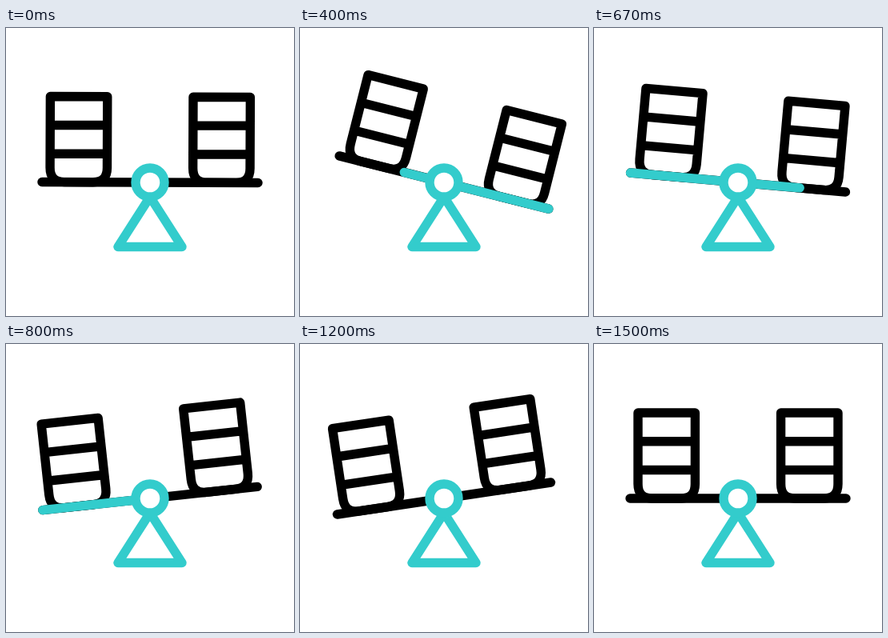
Recreate the animation shown at these times as an HTML page. Size 360 by 360 pixels, loop 1.67 s.

```html
<!DOCTYPE html>
<html lang="en">
<head>
<meta charset="utf-8">
<title>Seesaw</title>
<style>
  html, body { margin: 0; height: 100%; overflow: hidden; background: #fff; }
  svg { display: block; width: 100vw; height: 100vh; }
  .line { fill: none; stroke: #000; stroke-width: 11.4; stroke-linecap: round; stroke-linejoin: round; }
  .teal { stroke: #33cccc; }
</style>
</head>
<body>
<svg viewBox="0 0 360 360">
  <defs>
    <!-- Shelf unit standing on the beam, relative to the pivot -->
    <path id="shelves" d="M-35.7-107H35.7V-18Q35.7 0 18 0H-18Q-35.7 0-35.7-18ZM-35.7-71.3H35.7M-35.7-35.5H35.7"/>
  </defs>
  <g id="seesaw" class="line">
    <path d="M-135 0H135"/>
    <use href="#shelves" x="-89.3"/>
    <use href="#shelves" x="89.3"/>
    <path id="sweep" class="teal"/>
  </g>
  <path class="line teal" d="M180 211L140 273.5H220Z"/>
  <circle class="line teal" cx="180" cy="193" r="18" style="fill:#fff"/>
</svg>
<script>
  const LOOP = 1670, FRAME = 33.4, HALF = 135;
  const seesaw = document.getElementById('seesaw');
  const sweep = document.getElementById('sweep');

  // Eased progress from 0 to 1 between two frame positions
  function ease(frame, start, end) {
    const t = Math.min(1, Math.max(0, (frame - start) / (end - start)));
    return t * t * (3 - 2 * t);
  }

  function draw() {
    const frame = Math.floor((performance.now() % LOOP + 5) / FRAME);

    const angle = 14.5 * ease(frame, -1, 13.2)
                - 28.8 * ease(frame, 14.3, 29.2)
                + 14.3 * ease(frame, 29.2, 44.8);
    seesaw.setAttribute('transform', `translate(180 193) rotate(${angle})`);

    // The teal stretch grows from the right end, then leaves at the left
    const head = ease(frame, 3.5, 17);
    const tail = ease(frame, 15.3, 31.1);
    const x = part => HALF - 2 * HALF * part;
    sweep.setAttribute('d', head > 0 && tail < 1 ? `M${x(tail)} 0H${x(head)}` : '');

    requestAnimationFrame(draw);
  }
  draw();
</script>
</body>
</html>
```
